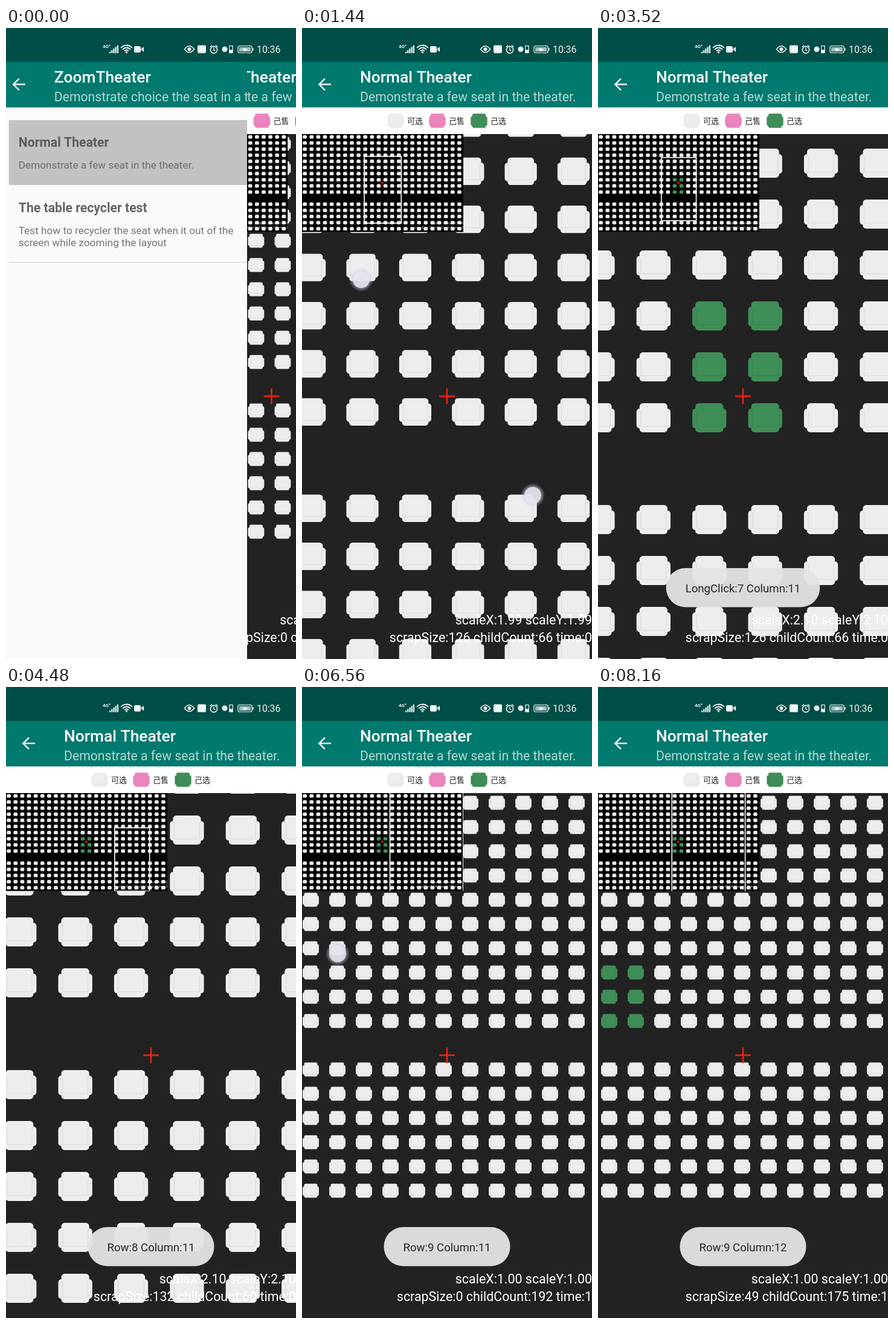
An HTML page with a canvas for the animation above (8320 ms loop, 480x1041 px).

```html
<!DOCTYPE html>
<html lang="en">
<head>
<meta charset="utf-8">
<title>Theater seats</title>
<style>
html, body { margin: 0; width: 100%; height: 100%; overflow: hidden; background: #222; }
canvas { display: block; width: 480px; height: 1041px; }
</style>
</head>
<body>
<canvas id="stage" width="480" height="1041"></canvas>
<script>
const ctx = document.getElementById('stage').getContext('2d');
const W = 480, H = 1041, TOP = 175, LOOP = 8320, STEP = 160;
const COLS = 24, SLOTS = 17, AISLE = 10, CW = 44, CH = 40, MINI = 0.2527;
const SANS = 'Roboto, "Noto Sans CJK SC", "Noto Sans CJK", sans-serif';
const FREE = '#ededed', SOLD = '#ec85bd', PICKED = '#3f8e57';

// time, scale, scroll x, scroll y
const view = [
  [0, 1, 288, 0], [800, 1, 288, 0], [1600, 2.1, 871, 321.6], [3680, 2.1, 871, 321.6],
  [4320, 2.1, 1495, 476.6], [4640, 2.1, 1495, 476.6], [5120, 2.1, 1529.5, 360.6],
  [5440, 2.1, 1529.5, 360.6], [6080, 1, 576, 0], [6800, 1, 576, 0],
  [8160, 1, 484, 0], [LOOP, 1, 484, 0]
];

// visible from, until, move start, move end, x0, y0, x1, y1
const touches = [
  [640, 1600, 800, 1440, 173, 509, 98, 415],
  [640, 1600, 800, 1440, 308, 678, 382, 771],
  [1760, 2400, 1760, 2400, 162, 473, 162, 473],
  [3680, 4160, 3680, 4160, 430, 660, 60, 580],
  [4640, 5120, 4640, 5120, 250, 520, 216, 636],
  [5280, 6080, 5440, 6080, 192, 581, 230, 600],
  [5280, 6080, 5440, 6080, 316, 642, 272, 620],
  [6240, 6720, 6240, 6560, 150, 440, 59, 440],
  [6880, 7840, 6880, 7840, 120, 440, 205, 440]
];

// time, column, slot
const picks = [
  [2560, 11, 7], [2720, 12, 7], [2880, 12, 8], [3040, 11, 8], [3200, 11, 9], [3360, 12, 9]
];

const toasts = [
  [2240, 'LongClick:7 Column:11'], [4000, 'Row:8 Column:11'],
  [5920, 'Row:9 Column:11'], [7840, 'Row:9 Column:12']
];

const lerp = (a, b, p) => a + (b - a) * p;
const clamp = v => Math.max(0, Math.min(1, v));
const ease = p => p * p * (3 - 2 * p);

function viewAt(t) {
  let i = 0;
  while (i < view.length - 2 && view[i + 1][0] <= t) i++;
  const a = view[i], b = view[i + 1];
  const p = ease(clamp((t - a[0]) / (b[0] - a[0])));
  return { s: lerp(a[1], b[1], p), x: lerp(a[2], b[2], p), y: lerp(a[3], b[3], p) };
}

function rect(x, y, w, h, fill) {
  ctx.fillStyle = fill;
  ctx.fillRect(x, y, w, h);
}

function pill(x, y, w, h, r, fill) {
  ctx.fillStyle = fill;
  ctx.beginPath();
  ctx.roundRect(x, y, w, h, r);
  ctx.fill();
}

function disc(x, y, r, fill) {
  ctx.fillStyle = fill;
  ctx.beginPath();
  ctx.arc(x, y, r, 0, 7);
  ctx.fill();
}

function line(color, width, ...pts) {
  ctx.strokeStyle = color;
  ctx.lineWidth = width;
  ctx.beginPath();
  for (let i = 0; i < pts.length; i += 2) ctx.lineTo(pts[i], pts[i + 1]);
  ctx.stroke();
}

function text(str, x, y, size, color, weight = 400, align = 'left') {
  ctx.font = `${weight} ${size}px ${SANS}`;
  ctx.textAlign = align;
  ctx.fillStyle = color;
  ctx.fillText(str, x, y);
}

function clipped(x, y, w, h, draw) {
  ctx.save();
  ctx.beginPath();
  ctx.rect(x, y, w, h);
  ctx.clip();
  draw();
  ctx.restore();
}

function seat(x, y, k, color) {
  ctx.fillStyle = color;
  ctx.beginPath();
  ctx.roundRect(x - 11 * k, y - 11.4 * k, 22 * k, 22.8 * k, 2.6 * k);
  ctx.roundRect(x - 13.4 * k, y - 7.1 * k, 26.8 * k, 15.4 * k, 2.4 * k);
  ctx.fill();
  if (k < 0.9) return;
  line('rgba(0,0,0,.09)', 0.5 * k,
    x - 10 * k, y - 6 * k, x - 10 * k, y + 7 * k, x + 10 * k, y + 7 * k, x + 10 * k, y - 6 * k);
}

function seats(t, s, ox, oy, k, bottom) {
  for (let r = 0; r < SLOTS; r++) {
    const y = (CH * r + 16) * s + oy;
    if (r === AISLE || y < TOP - 30 || y > bottom + 30) continue;
    for (let c = 0; c < COLS; c++) {
      const x = (CW * c + 18.5) * s + ox;
      if (x < -40 || x > W + 40) continue;
      const on = picks.some(p => p[1] === c && p[2] === r && t >= p[0]);
      seat(x, y, k, on ? PICKED : FREE);
    }
  }
}

function cross(x, y, r, width) {
  line('#f5200c', width, x - r, y, x + r, y);
  line('#f5200c', width, x, y - r, x, y + r);
}

function childCount(v) {
  const span = (start, size, cell, max) => {
    const a = Math.floor(start / cell), b = Math.min(max, Math.ceil((start + size) / cell));
    return [a, b];
  };
  const [c0, c1] = span(v.x, W, CW * v.s, COLS);
  const [r0, r1] = span(v.y, H - TOP, CH * v.s, SLOTS);
  const gap = r0 <= AISLE && r1 > AISLE ? 1 : 0;
  return (c1 - c0) * (r1 - r0 - gap);
}

function stats(t, v) {
  let count = childCount(v), scrap = 192 - count;
  if (t >= 6240 && t < 6880) { count = 192; scrap = 0; }
  if (t >= 6880) { count = 175; scrap = 49; }
  const s = v.s.toFixed(2);
  const ms = t < 960 ? 5 : v.s > 1.5 ? 0 : 1;
  return [`scaleX:${s} scaleY:${s}`, `scrapSize:${scrap} childCount:${count} time:${ms}`];
}

function miniMap(t, v, info) {
  clipped(0, TOP, 267, 161.5, () => {
    rect(0, TOP, 267, 162, '#000');
    seats(t, MINI, 0, TOP + 0.5, MINI, 336);
    cross(133, 255.5, 3.2, 1.2);
    text(info[0], 267, 324, 5.2, 'rgba(255,255,255,.7)', 400, 'right');
    text(info[1], 267, 331, 5.2, 'rgba(255,255,255,.7)', 400, 'right');
    const k = MINI / v.s;
    ctx.strokeStyle = '#fff';
    ctx.lineWidth = 1.6;
    ctx.strokeRect(v.x * k, TOP + v.y * k - (v.s < 1.02 ? 3 : 0), W * k, (H - TOP) * k);
  });
}

function header(title, sub) {
  rect(0, 56, W, 75, '#00796e');
  line('#fff', 2.4, 48, 93, 28, 93);
  line('#fff', 2.4, 38, 83.5, 28.4, 93, 38, 102.5);
  text(title, 96, 90, 26.4, '#fff', 500);
  text(sub, 96, 120.5, 21.2, 'rgba(255,255,255,.7)');
}

function listPage() {
  rect(0, 56, W + 120, H, '#fafafa');
  header('ZoomTheater', 'Demonstrate choice the seat in a theater.');
  rect(21, 152, W, 107, '#c2c2c2');
  const dark = '#5c5c5c', soft = '#6c6c6c';
  text('Normal Theater', 37, 196, 21.2, dark, 700);
  text('Demonstrate a few seat in the theater.', 37, 231.5, 17.2, soft);
  text('The table recycler test', 37, 304, 21.2, '#666', 700);
  text('Test how to recycler the seat when it out of the', 37, 339.5, 17.2, '#757575');
  text('screen while zooming the layout', 37, 359.5, 17.2, '#757575');
  rect(21, 386, W, 1, '#cfcfcf');
}

function theaterPage(t) {
  const v = viewAt(t), info = stats(t, v);
  rect(0, TOP, W, H - TOP, '#222');
  clipped(0, TOP, W, H - TOP, () => seats(t, v.s, -v.x, TOP - v.y, v.s, H));
  miniMap(t, v, info);
  cross(240, 607.5, 13, 2.6);
  text(info[0], W, 983.5, 21.4, '#fff', 400, 'right');
  text(info[1], W, 1012.5, 21.4, '#fff', 400, 'right');
  rect(0, 131, W, 44, '#fff');
  [[FREE, '可选'], [SOLD, '己售'], [PICKED, '己选']].forEach(([color, label], i) => {
    seat(155 + 69 * i, 153, 1.02, color);
    text(label, 174 + 69 * i, 158, 13, '#222');
  });
  header('Normal Theater', 'Demonstrate a few seat in the theater.');
}

function arcs(x, y, radii) {
  ctx.strokeStyle = '#fff';
  ctx.lineWidth = 1.8;
  for (const r of radii) {
    ctx.beginPath();
    ctx.arc(x, y, r, -Math.PI * 0.77, -Math.PI * 0.23);
    ctx.stroke();
  }
}

function statusBar() {
  const w = '#eef5f4';
  rect(0, 0, W, 56, '#004e46');
  text('4G⁺', 160, 33, 8, w, 700);
  for (let i = 0; i < 5; i++) rect(171 + 3.2 * i, 39 - 2.6 * i, 2.2, 2.6 * i + 2.5, w);
  arcs(199.5, 41, [4.5, 8.5, 12.5]);
  disc(199.5, 40, 1.8, w);
  pill(212, 30, 11, 10.5, 2, w);
  ctx.beginPath();
  ctx.moveTo(223, 35); ctx.lineTo(228, 31); ctx.lineTo(228, 39.5);
  ctx.fill();

  ctx.strokeStyle = w;
  ctx.lineWidth = 1.6;
  ctx.beginPath();
  ctx.moveTo(295.5, 35);
  ctx.quadraticCurveTo(303.5, 24.5, 311.5, 35);
  ctx.quadraticCurveTo(303.5, 45.5, 295.5, 35);
  ctx.stroke();
  disc(303.5, 35, 3, w);
  pill(317, 28.5, 14, 13, 2, w);
  ctx.beginPath();
  ctx.arc(344, 36, 5.6, 0, 7);
  ctx.stroke();
  line(w, 1.4, 344, 32.5, 344, 36.5, 346.5, 37.5);
  line(w, 1.6, 337.5, 31.5, 341, 28.5);
  line(w, 1.6, 347, 28.5, 350.5, 31.5);
  disc(362, 35, 4.5, w);
  ctx.lineWidth = 1.2;
  ctx.strokeRect(369.8, 29.5, 5.4, 11.5);
  rect(370, 36, 5, 5, w);
  ctx.beginPath();
  ctx.roundRect(384, 29.5, 23, 11.5, 2.5);
  ctx.stroke();
  rect(386, 31.5, 19, 7.5, 'rgba(238,245,244,.65)');
  rect(408, 33, 1.6, 4.5, w);
  line('#fff', 1.6, 391, 36, 396, 34, 395, 37, 400, 35);
  text('10:36', 415, 41, 15.8, w);
}

function toast(t) {
  const now = toasts.filter(m => t >= m[0]).pop();
  if (!now) return;
  ctx.font = `400 18.6px ${SANS}`;
  const w = ctx.measureText(now[1]).width + 64;
  pill(240 - w / 2, 891, w, 64.5, 32, 'rgba(228,228,228,.95)');
  text(now[1], 240, 930.5, 18.6, '#262626', 400, 'center');
}

function dot(x, y, alpha) {
  ctx.globalAlpha = alpha;
  const glow = ctx.createRadialGradient(x, y, 12, x, y, 20);
  glow.addColorStop(0, 'rgba(205,200,235,.7)');
  glow.addColorStop(1, 'rgba(205,200,235,0)');
  disc(x, y, 20, glow);
  disc(x, y, 14, 'rgba(232,232,236,.82)');
  ctx.globalAlpha = 1;
}

function fingers(t) {
  for (const [on, off, t0, t1, x0, y0, x1, y1] of touches) {
    if (t < on || t > off) continue;
    const p = ease(clamp((t - t0) / (t1 - t0 || 1)));
    dot(lerp(x0, x1, p), lerp(y0, y1, p), t === off ? 0.3 : 1);
  }
  const v = viewAt(t);
  for (const [at, c, r] of picks) {
    if (t === at) dot((CW * c + 18.5) * v.s - v.x, TOP + (CH * r + 16) * v.s - v.y, 0.9);
  }
}

function draw(t) {
  const p = 1 - 0.831 * Math.pow(1 - clamp(t / 560), 2);
  const edge = W * (1 - p);
  if (edge > 0.5) {
    ctx.save();
    ctx.translate(-0.2 * W * p, 0);
    listPage();
    ctx.restore();
  }
  clipped(edge, 56, W, H, () => {
    ctx.translate(edge / 2, 0);
    theaterPage(t);
  });
  statusBar();
  toast(t);
  fingers(t);
}

const start = performance.now();
function tick() {
  const t = (performance.now() - start) % LOOP;
  draw(Math.floor(t / STEP) * STEP);
  requestAnimationFrame(tick);
}
tick();
</script>
</body>
</html>
```
